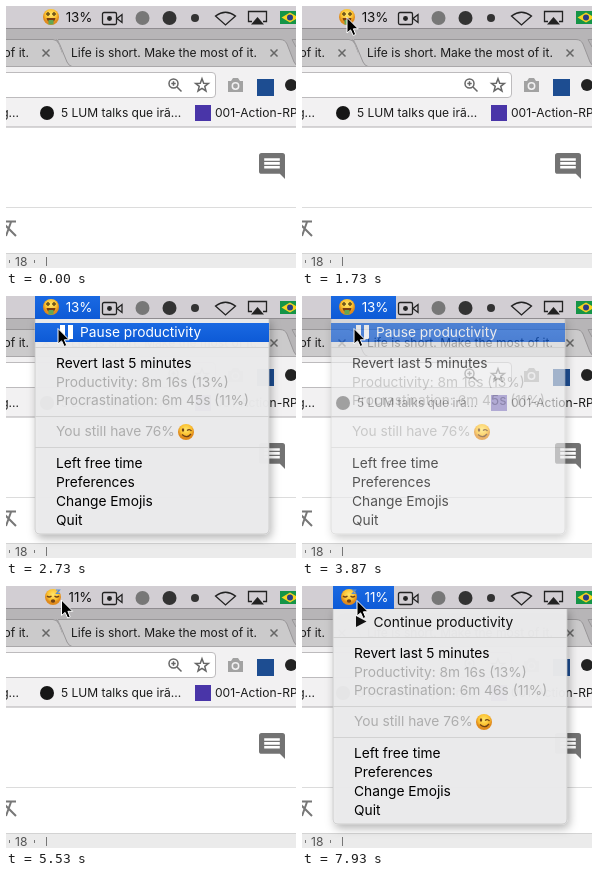
Recreate the animation shown at these times as an HTML page. Size 290x262 px, loop 8000 ms.

```html
<!DOCTYPE html>
<html lang="en">
<head>
<meta charset="utf-8">
<title>Menu bar timer</title>
<style>
html, body { margin: 0; width: 100%; height: 100%; overflow: hidden; background: #fff; }
svg { display: block; width: 290px; height: 262px; }
text { font: 13.75px Inter, "Open Sans", sans-serif; white-space: pre; }
.ui { font-size: 12.05px; fill: #1c1c1c; }
.dim { fill: #adadad; }
.line { fill: none; stroke: #222; stroke-width: 1.3; }
.grey { fill: none; stroke: #666; stroke-width: 1.5; }
.sep { stroke: #d2d2d2; }
</style>
</head>
<body>
<svg viewBox="0 0 290 262">
  <defs>
    <linearGradient id="blue" x2="0" y2="1"><stop stop-color="#1a69e2"/><stop offset="1" stop-color="#0d5ad6"/></linearGradient>
    <radialGradient id="skin" cy=".35"><stop stop-color="#ffe66b"/><stop offset=".7" stop-color="#fbc02f"/><stop offset="1" stop-color="#e08b1d"/></radialGradient>
    <filter id="shade" x="-20%" y="-20%" width="140%" height="140%"><feDropShadow dy="4" stdDeviation="5" flood-opacity=".3"/></filter>
    <clipPath id="below"><path d="M0 23H290V262H0Z"/></clipPath>
    <g id="money">
      <circle r="8" fill="url(#skin)"/>
      <path d="M-4.5 1H4.5Q4 5 0 5T-4.5 1Z" fill="#7a3d12"/>
      <path d="M-2.5 3H2.5V7.5H-2.5Z" fill="#62a654"/>
      <path d="M-5-3H-1M1-3H5M-3-5V-1M3-5V-1" stroke="#69511a" stroke-width="1.5"/>
    </g>
    <g id="sleep">
      <circle r="8" fill="url(#skin)"/>
      <path d="M-6-1Q-4 1-1.5-1M1.5-1Q4 1 6-1" fill="none" stroke="#704216" stroke-width="1.3"/>
      <ellipse cy="4" rx="2.2" ry="1.8" fill="#704216"/>
      <path d="M3-7H6.5L3.5-3.5H7" fill="none" stroke="#5b8fd0" stroke-width="1.2"/>
    </g>
    <g id="wink">
      <circle r="8" fill="url(#skin)"/>
      <ellipse cx="-3" cy="-2" rx="1.2" ry="1.7" fill="#704216"/>
      <path d="M1-1.5Q3.5-3.5 5.5-1M-4 2.5Q1 7 5 2" fill="none" stroke="#704216" stroke-width="1.3"/>
    </g>
    <path id="close" d="M-3.5-3.5 3.5 3.5M3.5-3.5-3.5 3.5" class="grey"/>
  </defs>

  <!-- browser window -->
  <path d="M0 23H290V61H0Z" fill="#b7b5b7"/>
  <path d="M-5 33.5H47Q51 33.5 53 38L60 56Q62 60 66 60.5H-5Z" fill="#cbcacb" stroke="#989698"/>
  <path d="M47 60.5Q58 60 56 46L53 38Q51 33.5 56 33.5H274Q279 33.5 281 38L288 56Q290 60.5 294 60.5Z" fill="#cbcacb"/>
  <path d="M52 33.5H274Q279 33.5 281 38L288 56Q290 60.5 294 60.5M50 33.5Q52 34 54 39L61 56Q63 60 66 60.5M290 41 286 33.5H292" fill="none" stroke="#989698"/>
  <path d="M0 61H290V121H0Z" fill="#f2f1f2"/>
  <path d="M0 60.5H290" stroke="#aaa8aa"/>
  <path d="M-5 66.5H206Q209.5 66.5 209.5 70V88Q209.5 91.5 206 91.5H-5Z" fill="#fff" stroke="#bdbbbd"/>
  <text class="ui" x="23" y="51" text-anchor="end">Life is short. Make the most of it.</text>
  <text class="ui" x="65" y="51">Life is short. Make the most of it.</text>
  <use href="#close" x="40" y="47"/><use href="#close" x="268" y="47"/>
  <g class="grey"><circle cx="167.5" cy="77.5" r="4.5"/><path d="M171 81 175.5 85.5M165.3 77.5H169.7M167.5 75.3V79.7"/></g>
  <path id="star" class="grey"/>
  <path d="M222 75H225L227 72H232L234 75H237V86H222Z" fill="#a2a2a2"/>
  <circle cx="229.5" cy="80" r="3.2" fill="#a2a2a2" stroke="#f2f1f2" stroke-width="1.5"/>
  <rect x="251" y="73" width="17" height="17" fill="#1d4d91"/>
  <circle cx="285" cy="79" r="6" fill="#222"/>
  <text class="ui" x="13" y="111" text-anchor="end">blog...</text>
  <circle cx="41" cy="107" r="7" fill="#161616"/>
  <text class="ui" x="55" y="111">5 LUM talks que irã...</text>
  <rect x="189" y="99" width="16" height="16" fill="#4935a8"/>
  <text class="ui" x="209" y="111">001-Action-RPG</text>

  <!-- page -->
  <path d="M0 121H290V247H0Z" fill="#fff"/>
  <path d="M0 121H290" stroke="#b0aeb0"/>
  <path d="M0 201.5H290" stroke="#dcdcdc"/>
  <g transform="translate(250.4 144.4) scale(1.3)">
    <path d="M4 2H20Q22 2 22 4V22L18 18H4Q2 18 2 16V4Q2 2 4 2Z" fill="#737373"/>
    <path d="M6 7H18M6 10H18M6 13H18" stroke="#fff" stroke-width="2"/>
  </g>
  <path d="M-4 215.5H10M5 216 0 230M-3 217 10 230" fill="none" stroke="#777" stroke-width="2"/>
  <path d="M0 247H290V262H0Z" fill="#ebebeb"/>
  <path d="M0 247.5H290" stroke="#d3d3d3"/>
  <path d="M3.5 254V257M28.5 254V257M40.5 251V260" stroke="#777"/>
  <text class="ui" x="9" y="260" style="fill:#555">18</text>

  <!-- dropdown -->
  <g id="menu" clip-path="url(#below)">
    <path d="M29 22H263V233Q263 238 258 238H34Q29 238 29 233Z" fill="#ebebec" fill-opacity=".97" stroke="#bbb" stroke-width=".6" filter="url(#shade)"/>
    <path id="row" d="M29 27H263V46H29Z" fill="url(#blue)"/>
    <path id="icon"/>
    <text id="action" y="41"></text>
    <path class="sep" d="M29 51.5H263M29 120.5H263M29 151.5H263"/>
    <g id="items"></g>
    <use href="#wink" x="180" y="136"/>
  </g>

  <!-- menu bar -->
  <path d="M0 0H290V23H0Z" fill="#d2ced3"/>
  <path d="M0 22.5H290" stroke="#8f8c90"/>
  <path id="title" fill="url(#blue)"/>
  <use id="face" y="11"/>
  <text id="percent" x="86.5" y="16" text-anchor="end" style="font-size:13.4px"></text>
  <g class="line">
    <rect x="96.5" y="6.5" width="14" height="12" rx="1.5"/>
    <path d="M111 12.5 116 8.5V16.5Z"/>
    <circle cx="103.5" cy="12.5" r="1.8" fill="#222"/>
    <path d="M209.5 10Q219.5 2.5 229.5 10L219.5 19Z"/>
    <path d="M246 15.5H242.5V5.5H260.5V15.5H257"/>
  </g>
  <path d="M251.5 11 258 18.5H245Z" fill="#222"/>
  <circle cx="136.5" cy="12" r="7" fill="#777"/>
  <circle cx="163.5" cy="12" r="7" fill="#333"/>
  <circle cx="189" cy="12" r="4" fill="#333"/>
  <path d="M274 5H294V18H274Z" fill="#159447"/>
  <path d="M275.5 11.5 284 6.5 292.5 11.5 284 16.5Z" fill="#f6d322"/>
  <circle cx="284" cy="11.5" r="3" fill="#283d86"/>

  <path id="cursor" d="M0 0V15.5L3.6 12.4 6.2 18 8.7 16.9 6.4 11.3H11.2Z" fill="#000" stroke="#fff"/>
</svg>
<script>
const $ = id => document.getElementById(id);
const set = (id, attrs) => { for (const k in attrs) $(id).setAttribute(k, attrs[k]); };

const starPoints = [...Array(10)].map((_, i) => {
  const r = i % 2 ? 2.9 : 6.8, a = i * Math.PI / 5;
  return [196 + r * Math.sin(a), 79.5 - r * Math.cos(a)];
});
set('star', { d: 'M' + starPoints.join('L') + 'Z' });

const rows = [
  ['Revert last 5 minutes', 72],
  ['Productivity: 8m 16s (13%)', 91, 'dim'],
  ['', 109, 'dim'],
  ['You still have 76%', 140, 'dim'],
  ['Left free time', 172],
  ['Preferences', 191],
  ['Change Emojis', 210],
  ['Quit', 228.5]
];
$('items').innerHTML = rows.map(([label, y, kind = '']) =>
  `<text x="50" y="${y}" class="${kind}">${label}</text>`).join('');
const lost = $('items').children[2];

// Pointer keys: time, x, y; motion eases between neighbours.
const path = [
  [870, 294, 96], [1300, 120, 44], [1733, 45, 11.5], [2070, 45, 11.5],
  [2400, 54, 42], [2733, 52, 32.5], [5200, 52, 32.5], [5533, 55.5, 14],
  [7860, 55.5, 14], [7930, 55, 14.5], [8000, 55, 14.5]
];
function pointer(t) {
  const i = path.findIndex(p => t <= p[0]);
  if (i < 1) return path[0].slice(1);
  const [a, b] = [path[i - 1], path[i]];
  const u = (t - a[0]) / (b[0] - a[0]), e = u * u * (3 - 2 * u);
  return [1, 2].map(k => a[k] + (b[k] - a[k]) * e);
}

const STEP = 200 / 3;
function draw(now) {
  const t = Math.floor((now % 8000 + 4) / STEP) * STEP + 0.1;
  const [x, y] = pointer(t);
  const asleep = t >= 4200, again = t >= 5800;
  const active = t >= 1800 && !asleep || again;
  const blink = t >= 3666 && t < 3733;
  const hover = !asleep && y >= 27 && !blink;
  const fade = again ? 1 : t < 1800 ? 0 : Math.max(0, Math.min(1, 1 - (t - 3800) / 200));

  set('cursor', { transform: `translate(${x} ${y})`, opacity: +(t >= 930) });
  set('menu', { opacity: fade, transform: `translate(${asleep ? 2 : 0} 0)` });
  set('row', { opacity: +hover });
  set('icon', {
    d: asleep ? 'M52 30 62.5 35.5 52 41Z' : 'M54 29H59V43H54ZM62 29H67V43H62Z',
    fill: hover ? '#fff' : '#111'
  });
  set('action', { x: asleep ? 69.5 : 74, fill: hover ? '#fff' : '#111' });
  $('action').textContent = asleep ? 'Continue productivity' : 'Pause productivity';
  lost.textContent = `Procrastination: 6m ${asleep ? 46 : 45}s (11%)`;

  set('title', { d: asleep ? 'M31 0H92V23H31Z' : 'M29 0H94V23H29Z', opacity: +active });
  set('face', { href: asleep ? '#sleep' : '#money', x: asleep ? 47 : 45 });
  set('percent', { fill: active ? '#fff' : '#111', 'font-weight': active ? 700 : 500 });
  $('percent').textContent = asleep ? '11%' : '13%';
}

const start = performance.now();
(function tick() {
  draw(performance.now() - start);
  requestAnimationFrame(tick);
})();
</script>
</body>
</html>
```
